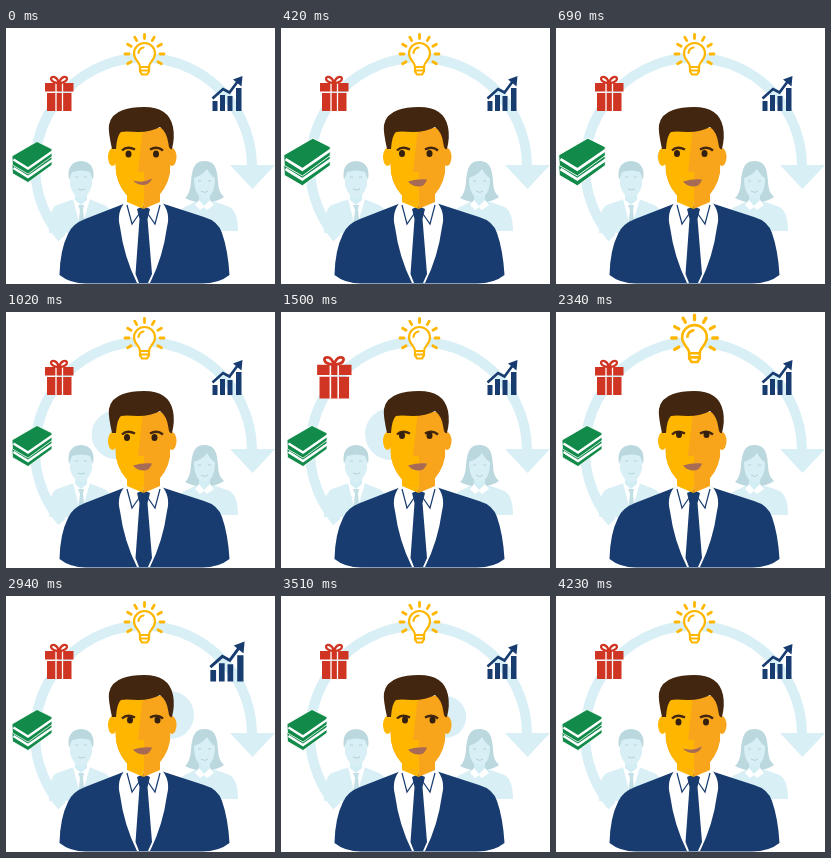
These frames come from a looping animation (269x256 px, 5.4 s). An HTML page:

```html
<!DOCTYPE html>
<html lang="en">
<head>
<meta charset="utf-8">
<title>Thinking through the options</title>
<style>
  html, body { margin: 0; width: 100%; height: 100%; overflow: hidden; background: #fff; }
  svg { display: block; width: 100%; height: 100%; }
</style>
</head>
<body>
<svg viewBox="0 0 269 256" fill="none">
  <!-- ring and arrow -->
  <path d="M56 210A108.500 108.500 0 1 1 246 138" stroke="#d8eff6" stroke-width="10"/>
  <path d="M224 137H269L246.500 161Z" fill="#d8eff6"/>

  <g id="bubbleLeft" fill="#daf0f6">
    <circle cx="110" cy="122" r="26"/>
    <path d="M88 131L98 145L110 142Z"/>
  </g>
  <g id="bubbleRight" fill="#daf0f6">
    <circle cx="164" cy="119" r="24"/>
    <path d="M184 122L180 138L166 139Z"/>
  </g>

  <!-- colleagues -->
  <g>
    <path d="M43 205Q43 180 51 177L68 171H83L98 177Q108 181 108 205Z" fill="#d8eff6"/>
    <path d="M67 171L75 202L84 171Z" fill="#fff"/>
    <path d="M72 177H78L77 182L79 200H72L74 182Z" fill="#c3dfe6"/>
    <path d="M69 163H81V172L75 177L69 172Z" fill="#d3edf4"/>
    <path d="M64 143Q75 136 86 143V157Q83 169 75 170Q67 169 64 157Z" fill="#d8eff5"/>
    <path d="M63 152Q60 134 75 133Q90 134 87 152L84 144Q76 141 66 144Z" fill="#bcd8df"/>
    <path d="M69 149H72M78 149H81M72 161Q75 163 79 161" stroke="#b3d2da"/>
  </g>
  <g>
    <path d="M170 203Q170 181 181 178L193 172H204L221 178Q232 181 232 203Z" fill="#d8eff6"/>
    <path d="M198 133C187 133 186 144 185 154Q184 166 179 170Q188 175 198 174Q210 175 218 169Q212 164 212 153C211 142 210 133 198 133Z" fill="#bcd8df"/>
    <path d="M193 164H204V173L198 179L193 173Z" fill="#d3edf4"/>
    <path d="M188 150Q197 147 201 141Q205 148 209 150Q209 169 198 170Q188 168 188 150Z" fill="#d8eff5"/>
    <path d="M193 172L198 178L204 172L208 177L201 182L198 179L194 182L189 177Z" fill="#fff"/>
    <path d="M192 153H195M202 153H205M195 163Q199 166 202 163" stroke="#b3d2da"/>
  </g>

  <!-- icons -->
  <g id="books"></g>
  <g id="gift">
    <path d="M39 55H67.500V63.500H39ZM41 65H65.500V83H41Z" fill="#cf3522"/>
    <path d="M50 55V83M56.500 55V83" stroke="#fff" stroke-width="1.300"/>
    <path d="M52 55C43 54 44 48 48 49C51 49.500 52 52 53 55C54 52 55 49.500 58 49C62 48 63 54 54 55" stroke="#cf3522" stroke-width="2.300"/>
  </g>
  <g id="bulb" stroke="#ffb600" stroke-width="2.200" stroke-linecap="round">
    <path d="M134 39C134 34 128 32 128 25.500A10.500 10.500 0 0 1 149 25.500C149 32 143 34 143 39Z" fill="#fff"/>
    <path d="M134 39V43.500L136 46.500H141L143 43.500V39M134 42.500H143M132.500 25Q133 20.500 137.500 19.500"/>
    <path id="rays" stroke-width="2.800"/>
  </g>
  <g id="chart">
    <path d="M206.500 73H211.500V83H206.500ZM214 67H219V83H214ZM221.500 68H226.500V83H221.500ZM230 60H235.500V83H230Z" fill="#183c70"/>
    <path d="M206.500 70.500L217 61L223.500 64.500L232 53" stroke="#183c70" stroke-width="2.600"/>
    <path d="M227 51.500L236.500 48L235.500 58.500Z" fill="#183c70"/>
  </g>

  <!-- main figure -->
  <path d="M53.500 247Q54 222 62 206Q66 196 79 191L120 175H155L198 189Q212 193 216 205Q222 222 223.500 247Q213 255.500 196 255.500H80Q64 255.500 53.500 247Z" fill="#183c70"/>
  <path d="M120 173Q110 184 114 199Q118 229 131 255H137.500V175Z" fill="#fff"/>
  <path d="M155 173Q165 184 161 199Q157 229 144 255H137.500V175Z" fill="#fff"/>
  <path d="M121 177L126 196L133 186M154 177L149 196L142 186" stroke="#183c70" stroke-width="1.200"/>
  <path d="M131 181L137.500 178L144 181L141.500 191L146 246L142 255H133L129.500 246L133.500 191Z" fill="#183c70"/>
  <path d="M121 158H137.500V181L121 174Z" fill="#ffb600"/>
  <path d="M137.500 158H154V174L137.500 181Z" fill="#f8a51b"/>
  <ellipse cx="106.500" cy="129" rx="4.500" ry="9" fill="#ffb600"/>
  <ellipse cx="166" cy="129" rx="4.500" ry="9" fill="#f8a51b"/>
  <path d="M108 100H165L164 145Q161 161 149 171Q137 178 125 171Q113 161 110 145Z" fill="#f8a51b"/>
  <path d="M108 100H137L134 126L132 144H138V174.500Q131 174 125 171Q113 161 110 145Z" fill="#ffb600"/>
  <path d="M106 121Q102 103 103 97Q105 86 117 82Q125 79 138 79Q163 79 167 99Q169 109 166 121Q163 122 162.500 116Q161 104 154 99Q145 104 132 104Q119 103 115 104Q111 107 110 121Z" fill="#42260f"/>
  <path d="M116 122.500Q121 117.500 129 121.500M144 121.500Q151 117.500 157 122.500" stroke="#42260f" stroke-width="2.300"/>
  <g id="pupils" fill="#33200f">
    <ellipse cx="122.500" cy="126" rx="3" ry="3.500"/>
    <ellipse cx="150" cy="126" rx="3" ry="3.500"/>
  </g>
  <path id="mouth" fill="#a66a55"/>
</svg>
<script>
const LOOP = 5400;
const $ = id => document.getElementById(id);
const clamp = x => Math.min(1, Math.max(0, x));
const ease = x => { x = clamp(x); return x * x * (3 - 2 * x); };
const easeOut = x => 1 - (1 - clamp(x)) ** 3;
const ramp = (t, start, end, curve = ease) => curve((t - start) / (end - start));

// Static repeats
$('books').innerHTML = [8.5, 0].map(y => `<g transform="translate(0 ${y})">
  <path d="M6 128L31 113.500L46 121V128.500L22 146L6.500 137Z" fill="#118a4a" stroke="#fff" stroke-width=".8"/>
  <path d="M7.500 131.500L22 140.500L46.500 123.500" stroke="#fff" stroke-width="2.400"/></g>`).join('');

$('rays').setAttribute('d', Array.from({ length: 9 }, (_, i) => {
  const a = (-210 + i * 30) * Math.PI / 180;
  const point = r => `${138.5 + r * Math.cos(a)} ${26 + r * Math.sin(a)}`;
  return `M${point(15.5)}L${point(19.5)}`;
}).join(''));

const icons = [
  { id: 'books', x: 26, y: 134, peak: 530, grow: .23 },
  { id: 'gift', x: 53, y: 66, peak: 1470, grow: .21 },
  { id: 'bulb', x: 138.5, y: 26, peak: 2260, grow: .19 },
  { id: 'chart', x: 221.5, y: 66, peak: 2880, grow: .15 }
];
const bubbles = [
  { id: 'bubbleLeft', x: 110, y: 132, show: [600, 1300], hide: [1750, 2150] },
  { id: 'bubbleRight', x: 166, y: 134, show: [2400, 2940], hide: [3400, 3900] }
];
// Each gaze shift: start, end, pupil x, pupil y
const gazes = [
  [30, 270, -1.5, -.5], [1170, 1410, -1.5, -2.5], [1770, 2100, .5, -3.5],
  [2400, 2700, 1.5, -2], [3800, 4230, 0, 0]
];

function scaleAbout(id, x, y, s) {
  $(id).setAttribute('transform', `translate(${x} ${y}) scale(${s}) translate(${-x} ${-y})`);
}

function draw(t) {
  for (const { id, x, y, peak, grow } of icons) {
    const pulse = t < peak ? ramp(t, peak - 300, peak) : 1 - ramp(t, peak, peak + 450);
    scaleAbout(id, x, y, 1 + grow * pulse);
  }
  for (const { id, x, y, show, hide } of bubbles) {
    scaleAbout(id, x, y, ramp(t, ...show, easeOut) * (1 - ramp(t, ...hide)));
  }

  let gx = 0, gy = 0;
  for (const [start, end, x, y] of gazes) {
    const k = ramp(t, start, end);
    gx += (x - gx) * k;
    gy += (y - gy) * k;
  }
  $('pupils').setAttribute('transform', `translate(${gx} ${gy})`);

  // Smile relaxes into a fuller, thoughtful mouth
  const pout = ramp(t, 30, 270) * (1 - ramp(t, 3800, 4230));
  $('mouth').setAttribute('d',
    `M127 ${152.5 + pout}Q137 ${155.5 - 5 * pout} 146 ${150.5 + pout}` +
    `Q144 ${156 + 2 * pout} 138 ${157 + 1.5 * pout}Q131 ${157 + 1.5 * pout} 127 ${152.5 + pout}Z`);
}

function tick() {
  draw(performance.now() % LOOP);
  requestAnimationFrame(tick);
}
tick();
</script>
</body>
</html>
```
